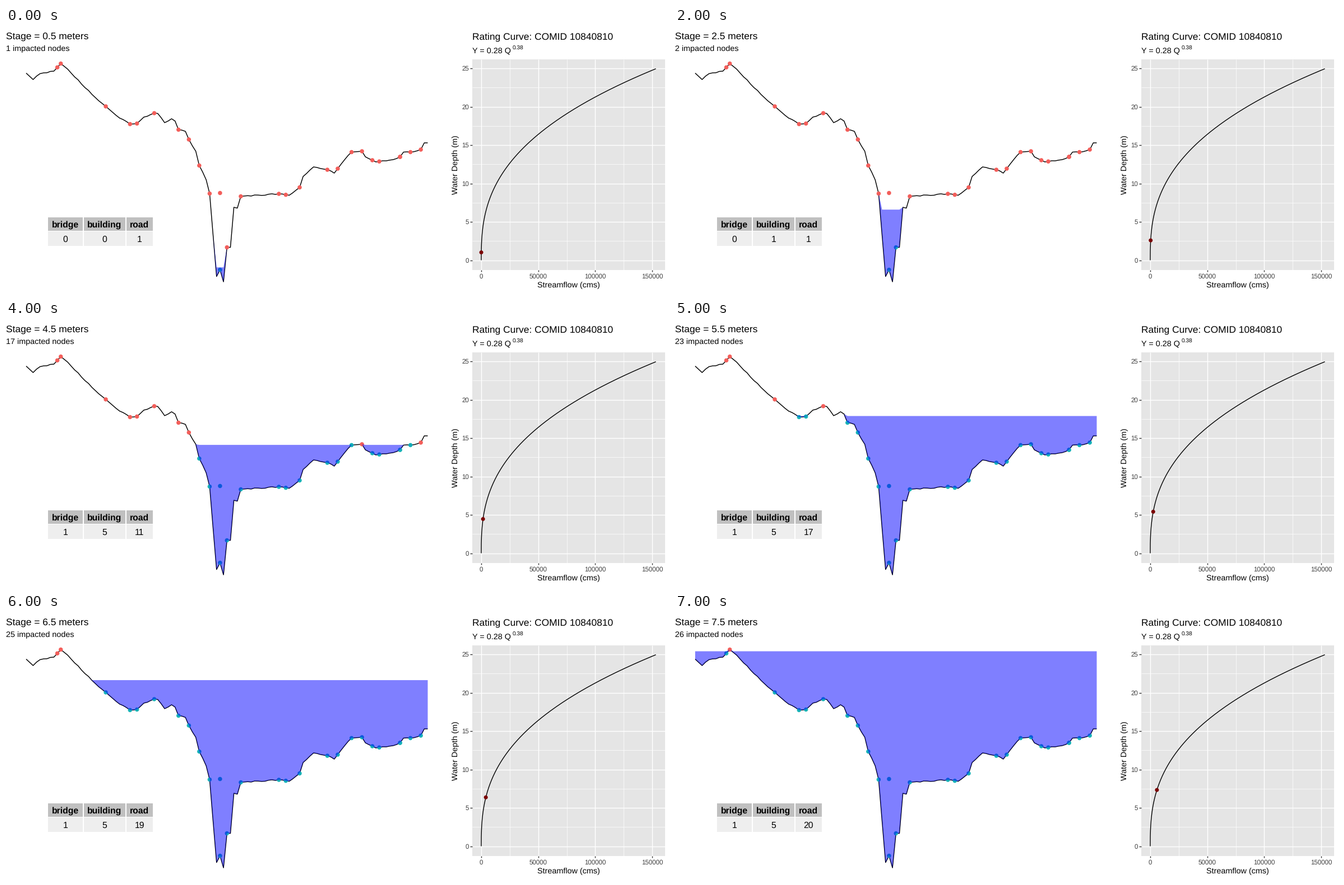
Recreate the animation shown at these times as a matplotlib script. Size 1183 px wide and 473 px high, loop 7.5 s.

```python
import numpy as np
import matplotlib.pyplot as plt
from matplotlib.animation import FuncAnimation
from matplotlib.patches import Circle, Polygon, Rectangle

W, H, DPI = 1183, 473, 64
PT = 72 / DPI  # points per pixel
plt.rcParams["font.family"] = "Liberation Sans"
plt.rcParams["text.hinting"] = "none"
plt.rcParams["toolbar"] = "None"

DRY, WET = "#F35E5A", "#17B3B7"
TITLE, BODY, SMALL, CELL = 17.33, 14.44, 11.55, 15.76

fig = plt.figure(figsize=(W / DPI, H / DPI), dpi=DPI, facecolor="white")
ax = fig.add_axes([0, 0, 1, 1])
ax.set_xlim(0, W)
ax.set_ylim(H, 0)
ax.axis("off")


def text(x, y, s, size, ha="left", **kw):
    return ax.text(x, y, s, fontsize=size * PT, ha=ha, va="baseline", **kw)


def line(x, y, width, color="black", z=2):
    ax.plot(x, y, color=color, lw=width * PT, zorder=z,
            solid_capstyle="butt", solid_joinstyle="round")


def rect(x0, y0, x1, y1, color):
    ax.add_patch(Rectangle((x0, y0), x1 - x0, y1 - y0, fc=color, lw=0, zorder=1))


def dot(x, y, r, color, z):
    return ax.add_patch(Circle((x, y), r, fc=color, lw=0, zorder=z))


# Valley cross-section: corner points (sample, height) joined by rough slopes
CORNERS = [
    (0, 80.5), (2, 92), (4, 81.5), (8, 77), (10, 63.5), (12, 73.5),
    (19, 118.5), (26, 156), (30, 171.5), (32, 170.5), (34, 159), (37, 152),
    (38, 152.5), (40, 169), (42, 162), (43, 166), (44, 181.5), (46, 184.5),
    (47, 199), (49, 220), (50, 245.5), (52, 271), (53, 295.5), (55, 443.5),
    (56, 431.5), (57, 453), (58, 391.5), (59, 391.5), (60, 320), (61, 321.5),
    (62, 300.5), (73, 296), (76, 298.5), (79, 284.5), (80, 265), (83, 248),
    (87, 253), (89, 259), (92, 235), (94, 221.5), (97, 220), (98, 230),
    (101, 239), (106, 235), (108, 230), (109, 221.5), (111, 221.5),
    (114, 217), (115, 205), (116, 205)]
ROADS = [9, 10, 23, 30, 32, 37, 44, 47, 50, 53, 56, 62, 90, 94, 97,
         100, 102, 108, 108, 111, 114]
BUILDINGS = [58, 73, 75, 79, 87]

corner_k, corner_y = np.transpose(CORNERS)
samples = np.arange(117)
gx = 36 + samples * 716.5 / 116
rough = np.random.default_rng(4).uniform(-1, 1, len(samples))
rough[np.r_[corner_k.astype(int), ROADS, BUILDINGS]] = 0
ground = np.interp(samples, corner_k, corner_y) + rough
line(gx, ground, 1.45, z=3)

nodes = [(gx[56], 294.5, "bridge")]
nodes += [(gx[i], ground[i], "building") for i in BUILDINGS]
nodes += [(gx[i], ground[i], "road") for i in ROADS]
node_dots = [dot(x, y, 3.75, DRY, 4) for x, y, _ in nodes]

water = ax.add_patch(Polygon([(0, 0), (1, 0), (1, 1)], fc="blue", alpha=0.5,
                             lw=0, zorder=5))

stage_text = text(0, 20, "", TITLE)
count_text = text(0, 41.5, "", BODY)

# Impact table
cells = {}
for name, x0, x1 in (("bridge", 75, 137.2), ("building", 138.6, 213.2),
                     ("road", 214.6, 262.2)):
    mid = (x0 + x1) / 2
    rect(x0, 338, x1, 362.2, "#C0C0C0")
    rect(x0, 363.2, x1, 388.5, "#EEEEEE")
    text(mid, 355.8, name, CELL, "center", weight="bold")
    cells[name] = text(mid, 382, "", CELL, "center")

# Rating curve panel
L, T, R, B = 832, 56, 1176, 431.5


def px(q):
    return 848 + q * 101.75 / 50000


def py(depth):
    return 414.5 - depth * 13.7


def flow(depth):
    return (depth / 0.2836) ** (1 / 0.375)


rect(L, T, R, B, "#E5E5E5")
for q in range(0, 150001, 25000):
    major = q % 50000 == 0
    line([px(q)] * 2, [T, B], 1.4 if major else 0.7, "white")
    if major:
        line([px(q)] * 2, [B, B + 3.7], 1.4, "#333333")
        text(px(q), 446.7, str(q), SMALL, "center", color="#404040")
for d in np.arange(0, 25.1, 2.5):
    major = d % 5 == 0
    line([L, R], [py(d)] * 2, 1.4 if major else 0.7, "white")
    if major:
        line([L - 3.7, L], [py(d)] * 2, 1.4, "#333333")
        text(826, py(d) + 4.2, f"{d:.0f}", SMALL, "right", color="#404040")
depths = np.linspace(0, 24.95, 300)
line(px(flow(depths)), py(depths), 1.4, z=3)

text(832, 20, "Rating Curve: COMID 10840810", TITLE)
text(832, 45.5, "Y = 0.28 Q", BODY)
text(904, 38.7, "0.38", BODY * 0.7)
text(1004, 463, "Streamflow (cms)", BODY, "center")
text(806, 244, "Water Depth (m)", BODY, "center", rotation=90,
     rotation_mode="anchor")
gauge = dot(848, 400, 3.5, "#7A0000", 6)


def update(k):
    stage = 0.5 * (k + 1)
    level = 453 - 51.53 * stage
    top = np.minimum(ground, level)
    water.set_xy(np.column_stack([np.r_[gx, gx[::-1]],
                                  np.r_[ground, top[::-1]]]))
    counts = dict.fromkeys(cells, 0)
    for (_, y, kind), mark in zip(nodes, node_dots):
        wet = y >= level
        counts[kind] += int(wet)
        mark.set_facecolor(WET if wet else DRY)
    for kind, cell in cells.items():
        cell.set_text(str(counts[kind]))
    stage_text.set_text(f"Stage = {stage:g} meters")
    count_text.set_text(f"{sum(counts.values())} impacted nodes")
    depth = np.hypot(0.97 * stage, 0.9)  # never below the base flow
    gauge.center = (px(flow(depth)), py(depth))
    return [water, gauge, stage_text, count_text, *node_dots, *cells.values()]


anim = FuncAnimation(fig, update, frames=15, interval=500, repeat=True,
                     repeat_delay=0, blit=False)
plt.show()
```
